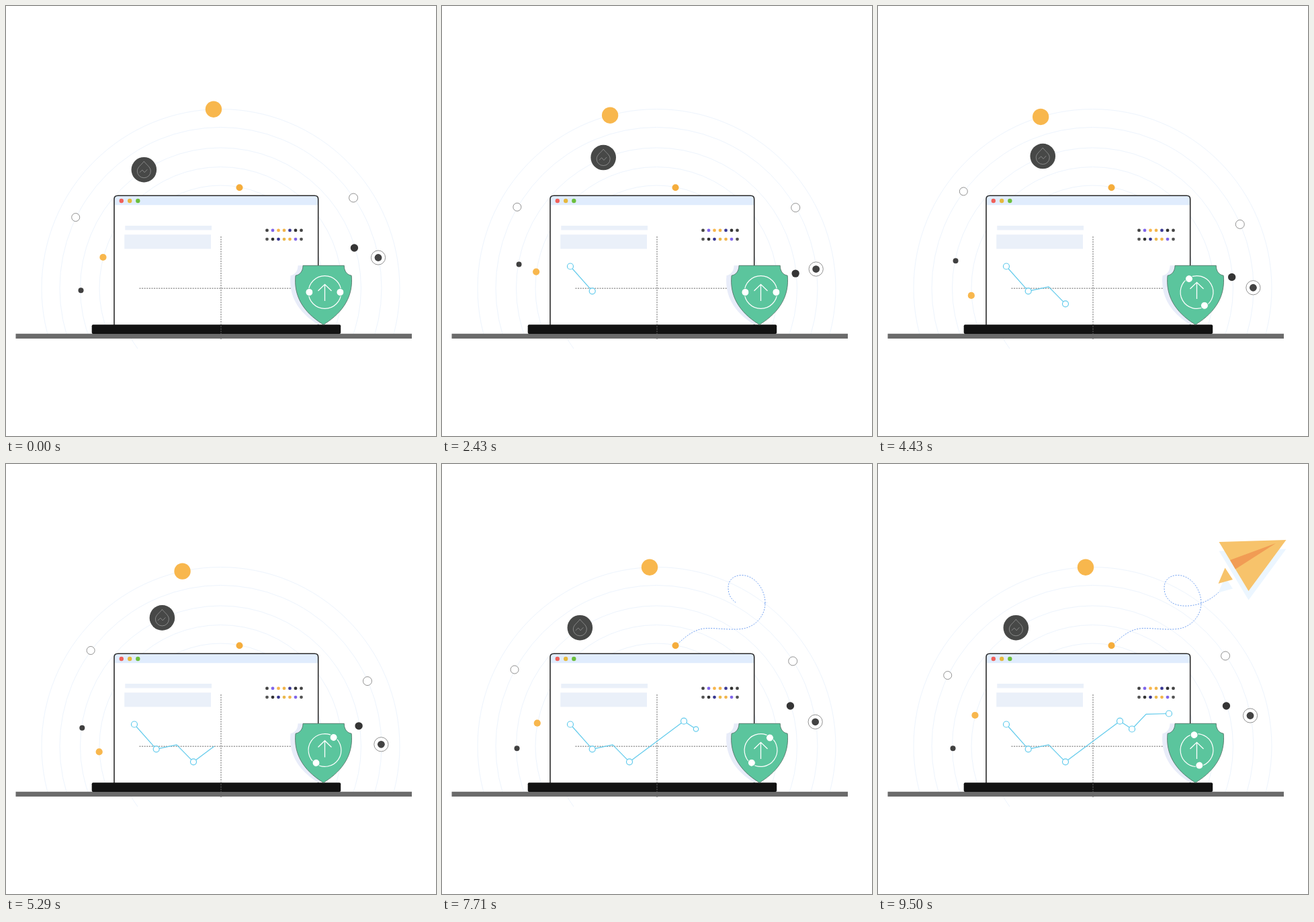
An HTML page for the animation above (9570 ms loop, 640 by 640 pixels).

```html
<!DOCTYPE html>
<html lang="en">
<head>
<meta charset="utf-8">
<title>Secure analytics</title>
<style>
  html, body { margin: 0; width: 100%; height: 100%; overflow: hidden; background: #fff; }
  svg { display: block; width: 100vw; height: 100vh; }
</style>
</head>
<body>
<svg viewBox="0 0 640 640" fill="none">
  <defs>
    <clipPath id="sky"><path d="M0 0H640V488H0Z"/></clipPath>
    <path id="flight" d="M347.500 270.500C361 259 374 244.500 396 244.500C414 244.500 436 248 451 244.500C469 240 481 224 481 207C481 187 466 165.500 446 165.500C433 165.500 426 174 426 184C426 194 430 201 437 206C450 215 484 214 508 190"/>
    <mask id="reveal" maskUnits="userSpaceOnUse" x="0" y="0" width="640" height="640">
      <use href="#flight" id="trail" stroke="#fff" stroke-width="5"/>
    </mask>
    <path id="badge" d="M442 386.300H503.300C503.300 394 507 400 514.200 401.200C517 430 504 455 472.500 474.300C441 455 428 430 431 401.200C438 400 442 394 442 386.300Z"/>
    <g id="wings">
      <path d="M507.500 116L607.500 113L551.500 189Z"/>
      <path d="M516.500 154.500L528 172L506.500 178Z"/>
    </g>
  </defs>

  <g id="arcs" stroke="#edf4fd" clip-path="url(#sky)"></g>
  <path d="M166.500 420A153 153 0 0 0 196 510" stroke="#edf4fd"/>

  <g id="orbits">
    <circle r="12.200" fill="#f8b74d"/>
    <g>
      <circle r="18.800" fill="#474847"/>
      <path d="M0-12.500C-4-7-10-4-10 2.200A10 9.800 0 0 0 10 2.200C10-4 4-7 0-12.500ZM-6.500 4L-2.500 .3L.8 4L5-.5" stroke="#a3a3a3" stroke-width=".7"/>
    </g>
    <circle r="4" fill="#404040"/>
    <circle r="5.700" fill="#353535"/>
    <circle r="6" fill="#fff" stroke="#777" stroke-width=".8"/>
    <circle r="6.500" fill="#fff" stroke="#777" stroke-width=".8"/>
    <g>
      <circle r="10.600" fill="#fff" stroke="#777" stroke-width=".8"/>
      <circle r="5.400" fill="#434343"/>
    </g>
    <circle r="5.100" fill="#f8b74d"/>
  </g>

  <g mask="url(#reveal)"><use href="#flight" stroke="#6f9ff0" stroke-dasharray="2 1.800"/></g>
  <circle cx="347.500" cy="270.300" r="5" fill="#f5ad3c"/>

  <g id="plane">
    <use href="#wings" y="13.500" fill="#ecf6ff"/>
    <use href="#wings" fill="#f7c36b"/>
    <path d="M524 143L592 118L532 156.500Z" fill="#f19c54"/>
  </g>

  <path d="M161 476V287.500Q161 282.300 166.500 282.300H459.500Q464.700 282.300 464.700 287.500V476" fill="#fff"/>
  <path d="M161 296.300V287.500Q161 282.300 166.500 282.300H459.500Q464.700 282.300 464.700 287.500V296.300Z" fill="#e0ecfd"/>
  <path d="M161 476V287.500Q161 282.300 166.500 282.300H459.500Q464.700 282.300 464.700 287.500V476" stroke="#2b2b2b" stroke-width="1.600"/>
  <circle cx="171.800" cy="290" r="3.200" fill="#f0605a"/>
  <circle cx="184.200" cy="290" r="3.200" fill="#e6b83d"/>
  <circle cx="196.300" cy="290" r="3.200" fill="#6bbf3d"/>
  <path d="M177.300 327H306V333.500H177.300ZM176.200 340.200H305V361.600H176.200Z" fill="#eaf0f9"/>
  <g id="swatches"></g>

  <path d="M14.500 487.800H604V495H14.500Z" fill="#6b6b6b"/>
  <rect x="127.700" y="474.200" width="370.500" height="13.700" rx="2" fill="#121212"/>
  <path d="M198.500 420.200H440M320 343V497" stroke="#666" stroke-dasharray="2 1.600"/>
  <g id="chart" stroke="#62cbec" stroke-width="1.200"></g>

  <use href="#badge" x="-7.500" fill="#e8ecf9"/>
  <use href="#badge" fill="#5bc59d" stroke="#4f6b60" stroke-width=".8"/>
  <g id="spinner">
    <circle cx="474.500" cy="426" r="24.400" stroke="#fff" stroke-width="1.200"/>
    <g fill="#fff" stroke="#5bc59d">
      <circle cx="451.400" cy="426" r="5.500"/>
      <circle cx="497.400" cy="426" r="5.500"/>
    </g>
  </g>
  <path id="arrow" d="M474.500 439V414.300M464.500 424L474.500 414.300L484.500 424" stroke="#fff" stroke-width="1.300"/>
</svg>

<script>
const LOOP = 9.57, SWING = 3.6, CENTER = [319.5, 420];
const $ = id => document.getElementById(id);
const clamp = v => Math.min(1, Math.max(0, v));
const progress = (t, from, to) => clamp((t - from) / (to - from));
// Linear out and back, once
const swing = (t, start, half = SWING) => clamp(1 - Math.abs(t - start - half) / half);

function add(parent, tag, attrs) {
  const node = document.createElementNS("http://www.w3.org/2000/svg", tag);
  for (const key in attrs) node.setAttribute(key, attrs[key]);
  return $(parent).appendChild(node);
}

for (const r of [266.5, 239.5, 209, 180.5, 153])
  add("arcs", "circle", { cx: CENTER[0], cy: CENTER[1], r });

const rows = [
  ["#444", "#8166ea", "#f8b74d", "#f2b54b", "#3b3a94", "#333", "#444"],
  ["#555", "#333", "#37368f", "#eab84c", "#f2b54b", "#8166ea", "#555"]
];
rows.forEach((row, j) => row.forEach((fill, i) =>
  add("swatches", "circle", { cx: 388.5 + 8.5 * i, cy: 333.9 + 13.2 * j, r: 2.4, fill })));

// radius, start angle, sweep, delay; in the order of the children of #orbits
const orbits = [
  [266.5, -92.26, -19, 0],
  [210, -122.93, 15.9, 0],
  [208, 179.1, 15.9, 0],
  [207.8, -16.78, 15.9, 0],
  [240.2, 206.05, 12, 1.19],
  [239, -34.25, 12, 1.19],
  [238.9, -10.98, 12, 1.19],
  [181, 194.73, -20.2, 1.19]
];

const lines = [
  ["M191 387.500L223.700 424.300", 0.65, 2.4],
  ["M223.700 424.300L254 418L279 443.300", 2.6, 4.4],
  ["M279 443.300L360 382.700", 4.6, 6.42],
  ["M360 382.700L378 394.500", 6.7, 7.65],
  ["M378 394.500L399 372.300L433 371.500", 7.85, 9.2]
].map(([d, from, to]) => ({ from, to, node: add("chart", "path", { d, pathLength: 1 }) }));

const nodes = [
  [191, 387.5, 0.5], [223.7, 424.3, 2.2], [279, 443.3, 4.2],
  [360, 382.7, 6.4], [378, 394.5, 7.58], [433, 371.5, 9.1]
].map(([cx, cy, from]) => ({ from, node: add("chart", "circle", { cx, cy, fill: "#fff" }) }));

function drawLine(node, part) {
  node.setAttribute("stroke-dasharray", `${part} 2`);
  node.style.visibility = part > 0 ? "visible" : "hidden";
}

const flightLength = $("flight").getTotalLength();

function render(t) {
  orbits.forEach(([r, angle, sweep, delay], i) => {
    const a = (angle + sweep * swing(t, delay)) * Math.PI / 180;
    const x = CENTER[0] + r * Math.cos(a), y = CENTER[1] + r * Math.sin(a);
    $("orbits").children[i].setAttribute("transform", `translate(${x} ${y})`);
  });

  for (const { from, to, node } of lines) drawLine(node, progress(t, from, to));
  for (const { from, node } of nodes) {
    const size = progress(t, from, from + 0.16);
    node.setAttribute("r", 4.5 * size);
    node.style.visibility = size > 0 ? "visible" : "hidden";
  }

  const flown = progress(t, 6.6, 8.02) * flightLength;
  $("trail").setAttribute("stroke-dasharray", `${flown} ${2 * flightLength}`);
  $("trail").style.visibility = flown > 0 ? "visible" : "hidden";

  const size = progress(t, 8.02, 8.7);
  $("plane").setAttribute("transform", `translate(508 190) scale(${size}) translate(-508 -190)`);
  $("plane").style.visibility = size > 0 ? "visible" : "hidden";

  $("spinner").setAttribute("transform", `rotate(${75 * Math.max(0, t - 3.63)} 474.5 426)`);
  $("arrow").setAttribute("transform", `translate(0 ${-4.3 * swing(t, SWING, 1.2)})`);
}

const began = performance.now();
function tick() {
  render((performance.now() - began) / 1000 % LOOP);
  requestAnimationFrame(tick);
}
tick();
</script>
</body>
</html>
```
